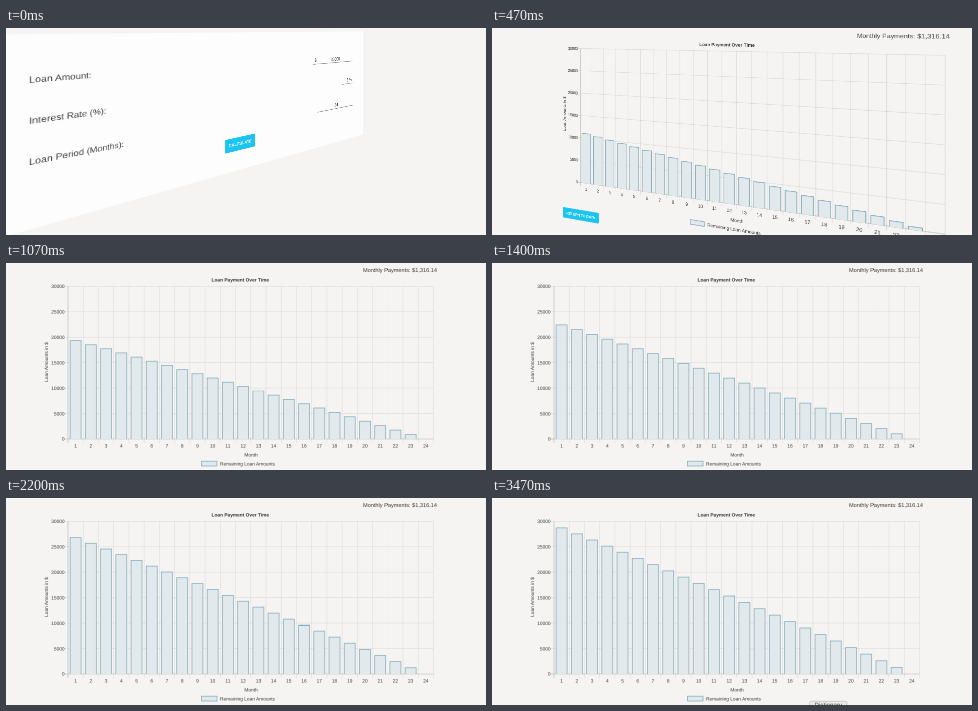
Recreate the animation shown at these times as an HTML page. Size 480 px wide and 207 px high, loop 3540 ms.

```html
<!DOCTYPE html>
<html lang="en">
<head>
<meta charset="utf-8">
<title>Loan calculator</title>
<style>
  html, body { margin: 0; width: 100%; height: 100%; overflow: hidden; background: #f5f4f2; }
  #stage { position: relative; width: 480px; height: 207px; overflow: hidden; }
  svg { position: absolute; left: 0; top: 0; overflow: visible; }
  /* Faces are laid out at double size and scaled down, so they stay sharp while turning. */
  .face { transform-origin: 0 0; will-change: transform; }
  text { font-family: "Liberation Sans", Arial, sans-serif; font-size: 4.8px; fill: #3c3c3c;
         text-rendering: geometricPrecision; }
  .button { fill: #1cc4f0; }
  .caption { font-size: 4.4px; font-weight: bold; fill: #fff; }
  .label { font-size: 6.3px; fill: #404040; }
  .input { font-size: 5.8px; fill: #333; }
  .rule { stroke: #8a8a8a; stroke-width: .7; }
  .grid { stroke: #000; stroke-opacity: .09; stroke-width: .6; }
  .axis { stroke: #000; stroke-opacity: .26; stroke-width: .6; }
  .bar { fill: #e2e9ec; stroke: #86afbd; stroke-width: .75; }
  .title { font-weight: bold; fill: #333; }
  .payment { font-size: 5.6px; }
  .tip { fill: #ebebea; stroke: #bdbdbb; stroke-width: .7; }
  .tipText { font-size: 6.2px; }
</style>
</head>
<body>
<div id="stage">
  <svg id="form" class="face" width="960" height="414" viewBox="0 0 480 207"></svg>
  <svg id="chart" class="face" width="960" height="414" viewBox="0 0 480 207"></svg>
  <svg id="overlay" width="480" height="207"></svg>
</div>
<script>
const LOOP = 3540;
const PERSPECTIVE = 310;
const LOAN = 30000, MONTHS = 24, RATE = 0.05 / 12, PAYMENT = 1316.14;
const LEFT = 62, RIGHT = 427.5, TOP = 23.3, BASE = 176;
const STEP = (RIGHT - LEFT) / MONTHS, BAR = STEP * 0.72;

const [form, chart, overlay] = ['form', 'chart', 'overlay'].map(id => document.getElementById(id));

function add(parent, tag, attributes, content = '') {
  const node = document.createElementNS('http://www.w3.org/2000/svg', tag);
  for (const name in attributes) node.setAttribute(name, attributes[name]);
  node.textContent = content;
  return parent.appendChild(node);
}
const rect = (parent, cls, x, y, width, height, rx = 0) =>
  add(parent, 'rect', { class: cls, x, y, width, height, rx });
const line = (parent, cls, x1, y1, x2, y2) =>
  add(parent, 'line', { class: cls, x1, y1, x2, y2 });
const text = (parent, cls, x, y, content, anchor = 'middle') =>
  add(parent, 'text', { class: cls, x, y, 'text-anchor': anchor }, content);

function buildForm() {
  add(form, 'rect', { x: 42, y: 4.3, width: 379.5, height: 135.5, fill: '#fdfdfe' });
  ['Loan Amount:', 'Interest Rate (%):', 'Loan Period (Months):'].forEach((label, i) =>
    text(form, 'label', 62, 37.8 + 28.5 * i, label, 'start'));
  text(form, 'input', 336, 39.6, '$');
  text(form, 'input', 369.5, 39.8, '30000');
  text(form, 'input', 400, 67.3, '5 %', 'end');
  text(form, 'input', 371, 96.2, '24');
  line(form, 'rule', 332.5, 42.2, 402, 42.2);
  line(form, 'rule', 381.5, 70.2, 402, 70.2);
  line(form, 'rule', 339, 98.7, 402, 98.7);
  rect(form, 'button', 216.3, 107.5, 34.5, 13, 1);
  text(form, 'caption', 233.5, 115.6, 'CALCULATE');
}

function buildChart() {
  text(chart, 'payment', 431, 9, 'Monthly Payments: $1,316.14', 'end');
  text(chart, 'title', 234.3, 18.3, 'Loan Payment Over Time');
  for (let i = 0; i <= 6; i++) {
    const y = BASE - (BASE - TOP) * i / 6;
    line(chart, i ? 'grid' : 'axis', LEFT - 4, y, RIGHT, y);
    text(chart, '', LEFT - 3.4, y + 1.7, i * 5000, 'end');
  }
  for (let i = 0; i <= MONTHS; i++) {
    const x = LEFT + STEP * i;
    line(chart, i ? 'grid' : 'axis', x, TOP, x, BASE + 4);
    if (i < MONTHS) text(chart, '', x + STEP / 2, 184.3, i + 1);
  }
  text(chart, '', 245, 193.3, 'Month');
  add(chart, 'text', { transform: 'translate(42 99) rotate(-90)', 'text-anchor': 'middle' },
    'Loan Amounts in $');
  rect(chart, 'bar', 195.4, 198.2, 15.6, 4.8);
  text(chart, '', 214, 202.4, 'Remaining Loan Amounts', 'start');
  rect(chart, 'button', 38, 207.2, 48, 12, 1);
  text(chart, 'caption', 62.2, 214.8, 'RETURN TO DATA');

  let balance = LOAN;
  return Array.from({ length: MONTHS }, (_, i) => {
    balance = balance * (1 + RATE) - PAYMENT;
    return {
      balance: Math.max(0, balance),
      x: LEFT + STEP * (i + 0.5) - BAR / 2,
      path: add(chart, 'path', { class: 'bar' })
    };
  });
}

function buildOverlay() {
  rect(overlay, 'tip', 317.5, 203.3, 37.5, 14, 2);
  text(overlay, 'tipText', 336.3, 209.2, 'Dictionary');
}

buildForm();
const bars = buildChart();
buildOverlay();

// Turns a face about the vertical line through the middle of the stage.
const turn = angle =>
  `translateX(240px) perspective(${PERSPECTIVE}px) rotateY(${angle}deg) translateX(-240px) scale(.5)`;

function draw(t) {
  const remaining = 148.2 * Math.max(0, 1 - t / 1000) ** 3.7;
  const showForm = remaining > 90;
  form.style.display = showForm ? '' : 'none';
  chart.style.display = showForm ? 'none' : '';
  form.style.transform = turn(180 - remaining);
  chart.style.transform = turn(-remaining);

  const growth = 1 - (1 - (t + 57) / 4650) ** 4;
  for (const { balance, x, path } of bars) {
    const y = BASE - (BASE - TOP) * balance * growth / LOAN;
    path.setAttribute('d', balance > 5 ? `M${x} ${BASE}V${y}h${BAR}V${BASE}` : '');
  }
  overlay.style.display = t >= 3000 ? '' : 'none';
}

function tick() {
  draw(performance.now() % LOOP);
  requestAnimationFrame(tick);
}
tick();
</script>
</body>
</html>
```
